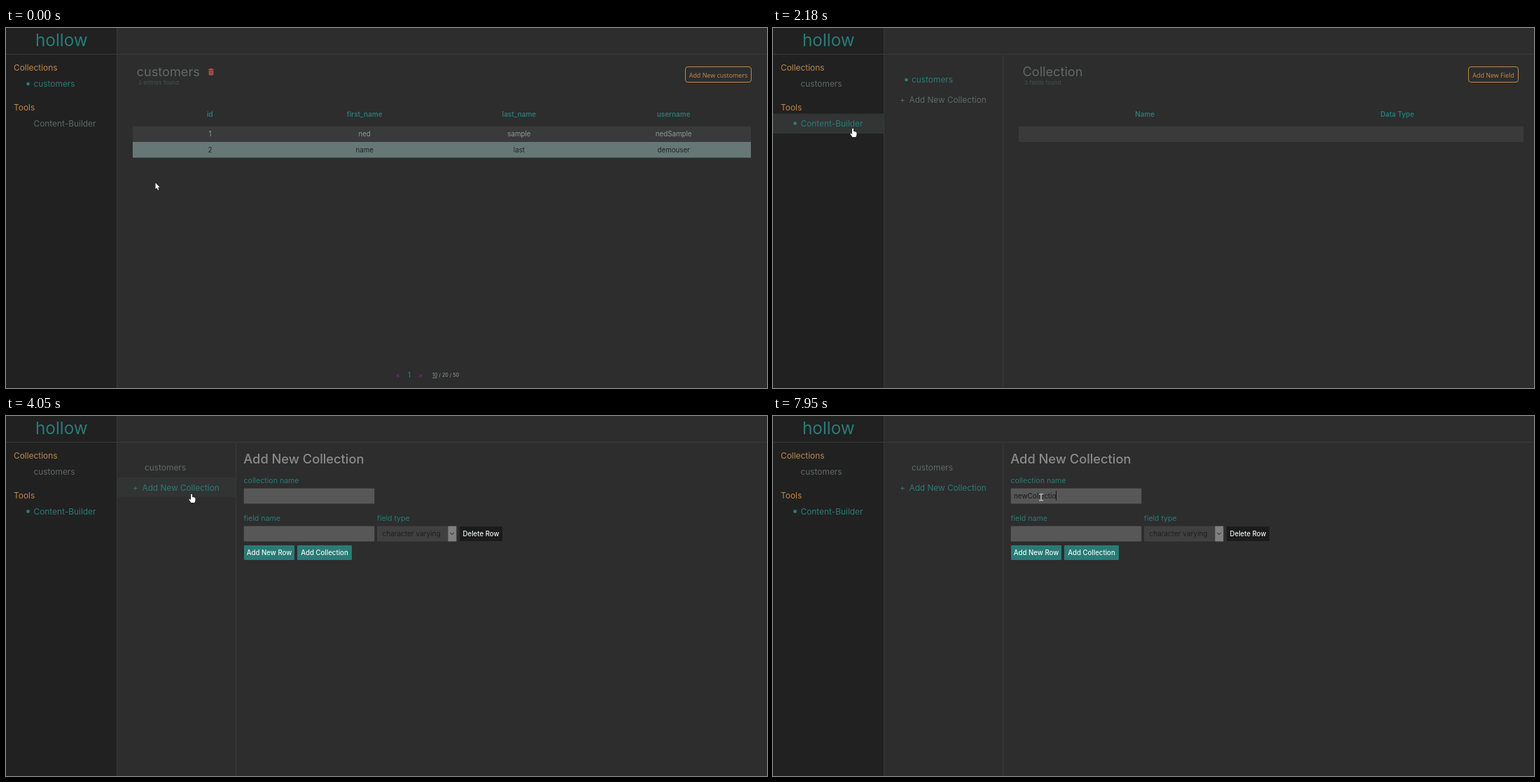
Animation, 1087 px wide and 515 px high, one loop 8000 ms. Source, as an HTML page with a canvas:

```html
<!DOCTYPE html>
<html lang="en">
<head>
<meta charset="utf-8">
<title>hollow admin</title>
<style>
  html, body { margin: 0; width: 100%; height: 100%; overflow: hidden; background: #2d2d2d; }
  canvas { display: block; }
</style>
</head>
<body>
<canvas id="stage" width="1087" height="515"></canvas>
<script>
const ctx = document.getElementById('stage').getContext('2d');
const LOOP = 8000;
const SANS = 'Inter, "Open Sans", sans-serif';
const BUTTON = '"Noto Sans", "Open Sans", sans-serif';
const TEAL = '#297b77', ORANGE = '#bb884b', GREY = '#626766', LINE = '#393939';

// Screen changes
const BUILDER = 2110, FIELDS = 2480, FORM = 4050, FOCUS = 5320;

// Mouse moves: start, end, steps, target x, target y, downward bow
const MOVES = [
  [370, 470, 2, 213, 220, 0],
  [620, 710, 2, 210, 218, 0],
  [1020, 1390, 5, 114, 144, 0],
  [2670, 3060, 5, 265, 112, 0],
  [4250, 4720, 6, 383, 116, 10]
];

const WORD = 'newCollectio';
const KEYS = [6330, 6410, 6490, 6790, 6980, 7180, 7280, 7380, 7570, 7750, 7850, 7950];

function rect(x, y, w, h, fill, r = 0) {
  ctx.fillStyle = fill;
  ctx.beginPath();
  ctx.roundRect(x, y, w, h, r);
  ctx.fill();
}

function text(str, x, y, size, fill, { weight = 400, align = 'left', font = SANS } = {}) {
  ctx.font = `${weight} ${size}px ${font}`;
  ctx.textAlign = align;
  ctx.fillStyle = fill;
  ctx.fillText(str, x, y);
}

function dot(x, y) {
  ctx.fillStyle = TEAL;
  ctx.beginPath();
  ctx.arc(x, y, 2.4, 0, 7);
  ctx.fill();
}

function shape(x, y, points, fill, stroke) {
  ctx.beginPath();
  for (let i = 0; i < points.length; i += 2) ctx.lineTo(x + points[i], y + points[i + 1]);
  ctx.closePath();
  ctx.fillStyle = fill;
  ctx.strokeStyle = stroke;
  ctx.lineWidth = 0.8;
  ctx.lineJoin = 'round';
  ctx.stroke();
  ctx.fill();
}

function mouseAt(t) {
  let x = 213, y = 221;
  for (const [start, end, steps, tx, ty, bow] of MOVES) {
    if (t < start) break;
    const gap = (end - start) / (steps - 1);
    const p = Math.min(steps, Math.floor((t - start) / gap + 1e-6) + 1) / steps;
    const e = p * p * (3 - 2 * p);
    x += (tx - x) * e;
    y += (ty - y) * e + bow * Math.sin(Math.PI * p);
  }
  return { x: Math.round(x), y: Math.round(y) };
}

const inside = (m, x, y, w, h) => m.x >= x && m.x < x + w && m.y >= y && m.y < y + h;

function menuItem(label, x, y, active, bulletX) {
  text(label, x, y, 11.9, active ? TEAL : GREY);
  if (active) dot(bulletX, y - 4);
}

function sidebar(t, m) {
  rect(0, 0, 158, 515, '#212121');
  if (inside(m, 0, 122, 158, 29)) rect(0, 122.5, 158, 28.5, '#323534');
  text('hollow', 42, 26, 24.3, TEAL);
  text('Collections', 11, 61.3, 11.9, ORANGE);
  menuItem('customers', 39.5, 84, t < BUILDER, 31.5);
  text('Tools', 11, 118, 11.9, ORANGE);
  menuItem('Content-Builder', 39.5, 140.5, t >= BUILDER, 31.5);
  rect(158, 0, 1, 515, LINE);
  rect(0, 37, 1087, 1, LINE);
}

function outlineButton(label, x) {
  ctx.strokeStyle = ORANGE;
  ctx.lineWidth = 1;
  ctx.beginPath();
  ctx.roundRect(x + 0.5, 55.5, 1064 - x, 22, 3.5);
  ctx.stroke();
  text(label, (x + 1065) / 2, 70.6, 8.9, ORANGE, { align: 'center', font: BUTTON });
}

function table(x, width, heads, rows) {
  const col = width / heads.length;
  const center = i => x + col * (i + 0.5);
  heads.forEach((h, i) => text(h, center(i), 127.2, 9.9, TEAL, { weight: 600, align: 'center' }));
  rows.forEach((row, r) => {
    const top = 140.4 + r * 22.6, odd = r % 2;
    rect(x, top, width, 22.6, odd ? '#667875' : '#3a3a3a');
    row.forEach((cell, i) =>
      text(cell, center(i), top + 15, 9.75, odd ? '#1e2322' : '#909b99', { align: 'center' }));
  });
}

function trash(x, y) {
  const red = '#bd5050';
  rect(x + 2.5, y, 3, 1.2, red);
  rect(x, y + 0.9, 8, 1.2, red);
  rect(x + 0.7, y + 2.6, 6.6, 7, red, 0.8);
  for (let i = 0; i < 3; i++) rect(x + 2.1 + i * 1.6, y + 3.8, 0.6, 4.6, '#5c3434');
}

function customersPage() {
  text('customers', 186.5, 68.7, 18.2, GREY);
  trash(289, 57.8);
  text('2 entries found', 189, 80.6, 8.1, '#4b504f');
  outlineButton('Add New customers', 970);
  table(181, 883, ['id', 'first_name', 'last_name', 'username'], [
    ['1', 'ned', 'sample', 'nedSample'],
    ['2', 'name', 'last', 'demouser']
  ]);
  text('«', 557, 499.5, 9.5, '#85208a');
  text('1', 574, 499.8, 9.8, '#2a8790');
  text('»', 589.5, 499.5, 9.5, '#85208a');
  text('10 / 20 / 50', 609, 499.2, 7.1, '#979f9d');
  rect(609, 500.3, 7, 0.7, '#979f9d');
}

function collectionPanel(t, m) {
  const adding = t >= FORM;
  if (inside(m, 159, 88, 169, 29)) rect(159, 88, 169, 28.5, adding ? '#323434' : '#303131');
  rect(328, 38, 1, 477, LINE);
  menuItem('customers', 198, 78.2, !adding, 190.5);
  const tint = adding ? TEAL : GREY;
  text('+', 181, 106.5, 11.8, tint);
  text('Add New Collection', 194.5, 106.5, 11.8, tint);
}

function fieldsPage(t) {
  text('Collection', 356.5, 68.5, 18.2, GREY);
  text('3 fields found', 359, 80.6, 8.1, '#4b504f');
  outlineButton('Add New Field', 993);
  const varying = ['first_name', 'last_name', 'username'].map(n => [n, 'character varying']);
  table(351, 721, ['Name', 'Data Type'], t < FIELDS ? [[]] : [['id', 'integer'], ...varying]);
}

function solidButton(label, x, y, w, fill) {
  rect(x, y, w, 21, fill, 1);
  text(label, x + w / 2, y + 14, 9.65, '#f2f4f4', { weight: 500, align: 'center' });
}

function inputBox(label, y) {
  text(label, 339.5, y - 8, 10.6, TEAL);
  rect(339.7, y - 0.4, 186.6, 21.8, '#575757', 1);
}

function formPage(t) {
  text('Add New Collection', 339.3, 68.4, 18.25, '#8b8b8b', { weight: 500 });
  inputBox('collection name', 104);
  inputBox('field name', 158);
  text('field type', 530, 150, 10.5, TEAL);

  rect(530, 157.6, 113.3, 21.8, '#404040', 1);
  text('character varying', 537.5, 172.3, 10, '#1f1f1f');
  rect(631.5, 157.6, 11.8, 21.8, '#808080');
  ctx.strokeStyle = '#444';
  ctx.lineWidth = 1.1;
  ctx.beginPath();
  ctx.moveTo(634.5, 167);
  ctx.lineTo(637.2, 169.7);
  ctx.lineTo(640, 167);
  ctx.stroke();

  solidButton('Delete Row', 648, 158, 61, '#1b1b1b');
  solidButton('Add New Row', 340, 185, 72, TEAL);
  solidButton('Add Collection', 416, 185, 78, TEAL);

  const typed = WORD.slice(0, KEYS.filter(k => t >= k).length);
  text(typed, 344, 118, 9.9, '#161616');
  const hidden = t < FOCUS || (t >= 5410 && t < 5910);
  if (!hidden) rect(Math.round(344 + ctx.measureText(typed).width), 107, 1, 14, '#161616');
}

function cursor(t, m) {
  const overLink = inside(m, 0, 122, 158, 29) || (t >= BUILDER && inside(m, 159, 60, 169, 57));
  if (overLink) {
    shape(m.x, m.y, [-1, 0.2, 0, -0.4, 1, 0.2, 1, 4, 3.4, 4.3, 5.4, 5.6, 5.4, 9, 4.3, 12, -0.6, 12,
      -3.6, 7.6, -3, 6.6, -1, 8], '#fff', '#222');
  } else if (t >= FORM && inside(m, 340, 104, 186, 21)) {
    rect(m.x - 3, m.y - 5, 6, 1.5, '#b5b5b5');
    rect(m.x - 0.8, m.y - 4, 1.6, 9, '#b5b5b5');
    rect(m.x - 3, m.y + 4, 6, 1.5, '#b5b5b5');
  } else {
    shape(m.x + 0.5, m.y + 0.5, [0, 0, 0, 8.8, 2, 7, 3.5, 10.4, 4.9, 9.8, 3.5, 6.5, 6, 6.3], '#fff', '#111');
  }
}

function draw(t) {
  const m = mouseAt(t);
  rect(0, 0, 1087, 515, '#2d2d2d');
  if (t < BUILDER) {
    customersPage();
  } else {
    collectionPanel(t, m);
    if (t < FORM) fieldsPage(t);
    else formPage(t);
  }
  sidebar(t, m);
  cursor(t, m);
}

const begin = performance.now();
function tick() {
  draw((performance.now() - begin) % LOOP);
  requestAnimationFrame(tick);
}
tick();
</script>
</body>
</html>
```
